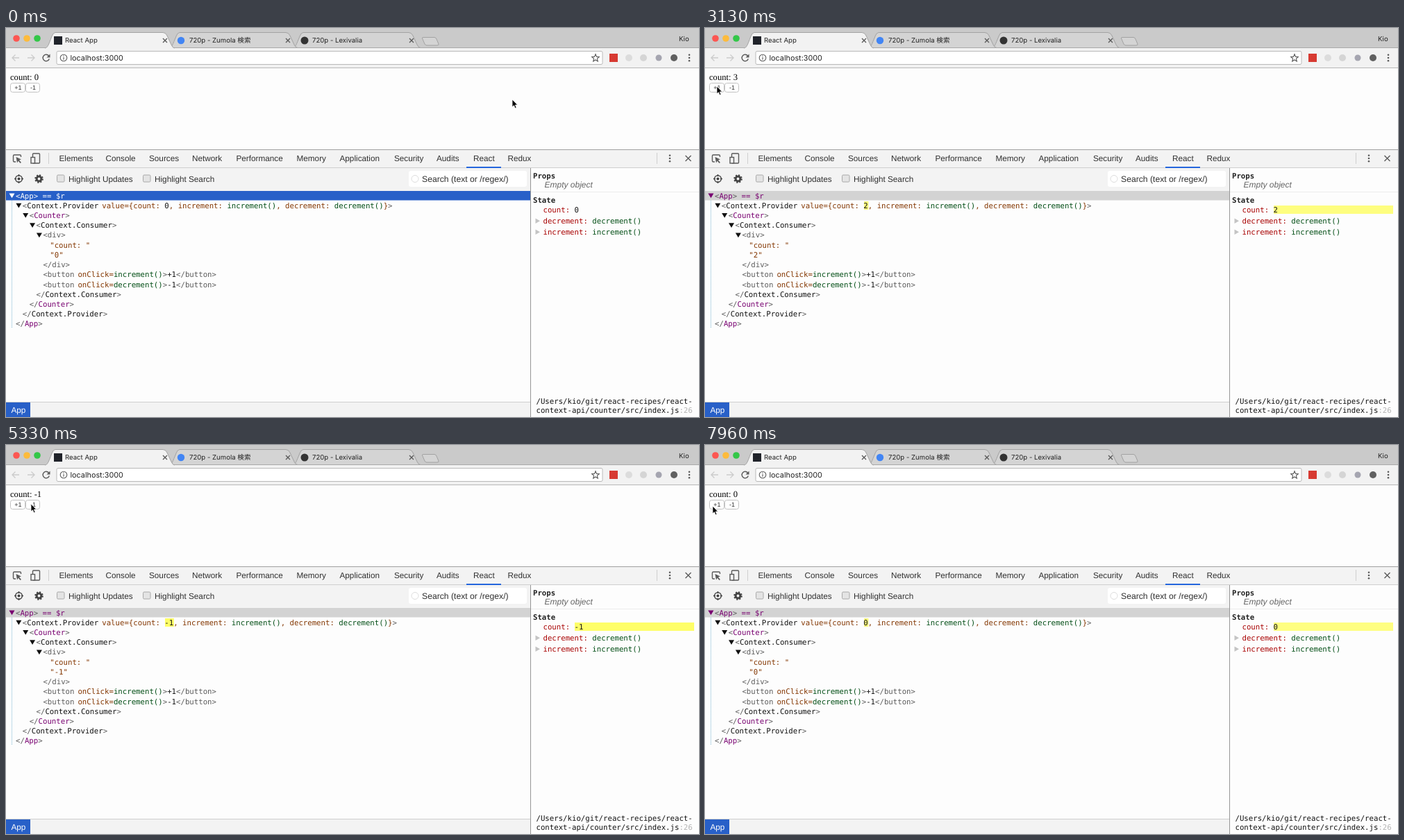
An HTML page for the animation above (8 s loop, 998 by 561 pixels).

```html
<!DOCTYPE html>
<html lang="en">
<head>
<meta charset="utf-8">
<title>Counter</title>
<style>
html, body { margin: 0; width: 100%; height: 100%; overflow: hidden; background: #fdfdfd }
svg { display: block; width: 998px; height: 561px }
text { white-space: pre; text-rendering: geometricPrecision; font: 11.75px "Liberation Sans", Arial, sans-serif; fill: #303030 }
.title { font: 9.6px Inter, "Noto Sans CJK JP", "Noto Sans CJK", sans-serif; fill: #222 }
.mono text { font: 10.7px "DejaVu Sans Mono", monospace; fill: #111 }
.mono .b { font-weight: bold; fill: #222 }
.p { fill: #780070 } .g { fill: #5c5c5c } .k { fill: #111 } .a { fill: #833600 }
.f { fill: #004d14 } .r { fill: #a80000 } .l { fill: #b4b4b4 }
.focus .sel { fill: #2860c8 } .sel { fill: #d3d3d3 }
.focus #row0 *, .focus #row0 { fill: #fff }
.line { fill: none; stroke: #5a5a5a; stroke-width: 1.4 }
</style>
</head>
<body>
<svg viewBox="0 0 998 561">
  <defs>
    <path id="close" class="line" d="M-3-3 3 3M3-3-3 3"/>
    <g id="dots" fill="#5a5a5a"><circle cy="-4.3" r="1.3"/><circle r="1.3"/><circle cy="4.3" r="1.3"/></g>
    <path id="down" d="M-4-3.3H4L0 3.5Z"/>
  </defs>

  <!-- tab strip -->
  <rect width="998" height="29" fill="#cacaca"/>
  <circle cx="15" cy="15" r="4.8" fill="#fc5652"/>
  <circle cx="30" cy="15" r="4.8" fill="#fdbb3c"/>
  <circle cx="45" cy="15" r="4.8" fill="#33c748"/>
  <g stroke="#a2a2a2" fill="#d4d4d4">
    <path d="M413 28.5C417 28 418 24 423 12Q425 6.5 428 6.5H580Q584 6.5 586 11L592 24Q594 28.5 597 28.5"/>
    <path d="M235 28.5C239 28 240 24 245 12Q247 6.5 250 6.5H403Q407 6.5 409 11L415 24Q417 28.5 420 28.5"/>
    <path d="M601 13.5H617Q619 13.5 620 16L623 23Q623.5 25 621 25H606Q604 25 603 23L599.5 15Q599 13.5 601 13.5Z"/>
  </g>
  <path d="M0 28.5H998" stroke="#a9a9a9"/>
  <rect y="29" width="998" height="28" fill="#f2f2f2"/>
  <path d="M56 29C60 28.5 61 25 66 12Q68 6.5 71 6.5H226Q230 6.5 232 11L238 24Q240 29 243 29" fill="#f2f2f2" stroke="#a2a2a2"/>
  <rect x="57" y="29" width="185" height="2" fill="#f2f2f2"/>
  <rect x="69" y="12" width="12" height="12" fill="#20232a"/>
  <circle cx="252" cy="18" r="5.2" fill="#4285f4"/>
  <circle cx="430" cy="18" r="5.5" fill="#333"/>
  <text class="title" x="85" y="21">React App</text>
  <text class="title" x="264" y="21">720p - Zumola 検索</text>
  <text class="title" x="441" y="21">720p - Lexivalia</text>
  <text class="title" x="969" y="19">Kio</text>
  <use href="#close" x="229" y="18"/><use href="#close" x="406" y="18"/><use href="#close" x="584" y="18"/>

  <!-- address bar -->
  <path d="M0 57.5H998" stroke="#b8b8b8"/>
  <path d="M19 43H9M13.5 38.5 9 43 13.5 47.5M31 43H41M36.5 38.5 41 43 36.5 47.5" class="line" style="stroke:#ccc"/>
  <path d="M61.5 40A4.7 4.7 0 1 0 62.3 44.5" class="line"/>
  <path d="M63.5 37.5V42.5H58.5Z" fill="#5a5a5a"/>
  <rect x="73" y="33.5" width="786" height="19" rx="2" fill="#fff" stroke="#b9b9b9"/>
  <text class="title" x="92.5" y="46.8" style="font-size:10.8px">localhost:3000</text>
  <g class="line" style="stroke-width:1.1"><circle cx="83" cy="43" r="4.8"/><path d="M83 42V45.8M83 39.8V41"/>
    <path d="M849 37.8 850.5 41.4 854.3 41.7 851.4 44.2 852.3 48 849 46 845.7 48 846.6 44.2 843.7 41.7 847.5 41.4Z"/></g>
  <rect x="869" y="37" width="12" height="12" fill="#d73a32"/>
  <circle cx="897" cy="43" r="5" fill="#dcdcdc"/><circle cx="918" cy="43" r="5" fill="#d5d5d5"/>
  <circle cx="940" cy="43" r="4.5" fill="#a5a5b0"/><circle cx="962" cy="43" r="5" fill="#606060"/>
  <use href="#dots" x="984" y="43"/>

  <!-- web page -->
  <text x="6" y="75" style="font:12.6px 'Liberation Serif',Times,serif;fill:#000">count: <tspan id="pageCount"></tspan></text>
  <g fill="#fff" stroke="#c2c2c2"><rect x="6.5" y="79.5" width="21" height="13" rx="3"/><rect x="28.5" y="79.5" width="20" height="13" rx="3"/></g>
  <g text-anchor="middle"><text x="17.5" y="89" style="font-size:9px">+1</text><text x="39" y="89" style="font-size:9px">-1</text></g>

  <!-- developer tools bars -->
  <rect y="175" width="998" height="27" fill="#f3f3f3"/>
  <rect y="202" width="755" height="33" fill="#f3f3f3"/>
  <path d="M0 175.5H998" stroke="#a0a0a0"/>
  <path d="M0 201.5H998M61.5 180V196M937.5 180V196M0 539.5H755" stroke="#cfcfcf"/>
  <rect x="663" y="200" width="50" height="2" fill="#2466dd"/>
  <g id="tabs"></g>
  <g class="line"><path d="M14 193H12Q10.5 193 10.5 191.5V184.5Q10.5 183 12 183H20Q21.5 183 21.5 184.5V186"/>
    <rect x="38.5" y="181" width="10" height="14" rx="1"/><rect x="36" y="186.5" width="5.5" height="8.5" fill="#f3f3f3"/></g>
  <path d="M14.5 186 22 189.5 19 190.5 22 194 20.5 195 17.8 191.8 16 194.5Z" fill="#5a5a5a"/>
  <use href="#dots" x="956" y="188"/>
  <path d="M978.5 184 986.5 192M986.5 184 978.5 192" class="line"/>
  <g class="line" style="stroke:#444"><circle cx="18.5" cy="217.5" r="4.8"/><path d="M18.5 211V214M18.5 221V224M12 217.5H15M22 217.5H25"/></g>
  <circle cx="18.5" cy="217.5" r="2" fill="#444"/>
  <g fill="none" stroke="#444"><circle cx="47.5" cy="217.5" r="3.4" stroke-width="3"/>
    <circle cx="47.5" cy="217.5" r="5.3" stroke-width="2" stroke-dasharray="2.08"/></g>
  <g fill="#e4e4e4" stroke="#a9a9a9"><rect x="73.5" y="212" width="10.5" height="10" rx="1.5"/><rect x="197.5" y="212" width="10.5" height="10" rx="1.5"/></g>
  <text x="90" y="222">Highlight Updates</text>
  <text x="214" y="222">Highlight Search</text>
  <rect x="580" y="206" width="170" height="23" rx="3" fill="#fff"/>
  <circle cx="589" cy="217.5" r="5" fill="none" stroke="#ddd"/>
  <text x="599" y="222" style="font-size:12.2px">Search (text or /regex/)</text>

  <!-- component tree -->
  <g id="tree" class="mono">
    <rect class="sel" y="235" width="755" height="13.5"/>
    <path d="M8.5 249V433" stroke="#7fb9d4" stroke-dasharray="1 1"/>
    <rect id="treeFlash" x="229" y="250" height="12" fill="#ff0"/>
  </g>
  <rect y="540" width="755" height="21" fill="#f3f3f3"/>
  <rect y="540" width="35" height="21" fill="#2860c8"/>
  <text x="7.5" y="554.5" style="fill:#fff">App</text>

  <!-- side pane -->
  <path d="M755.5 202V561" stroke="#969696"/>
  <path d="M756 236.5H998" stroke="#ececec"/>
  <rect id="paneFlash" x="819" y="256" width="172" height="12" fill="#ff0"/>
  <text x="775.5" y="230" style="font-size:12px;font-style:italic;fill:#666">Empty object</text>
  <path d="M762.5 274.5V282L769 278.2ZM762.5 290.5V298L769 294.2Z" fill="#c4c4c4"/>
  <g class="mono">
    <text x="759" y="216.5" class="b">Props</text>
    <text x="759" y="251.5" class="b">State</text>
    <text x="773.5" y="265.5"><tspan class="r">count:</tspan> <tspan id="paneCount"></tspan></text>
    <text x="773.5" y="282"><tspan class="r">decrement:</tspan> <tspan class="f">decrement()</tspan></text>
    <text x="773.5" y="298"><tspan class="r">increment:</tspan> <tspan class="f">increment()</tspan></text>
    <text x="763.5" y="542">/Users/kio/git/react-recipes/react-</text>
    <text x="763.5" y="554.5">context-api/counter/src/index.js<tspan class="l">:26</tspan></text>
  </g>
  <path id="cursor" d="M0 0V11L2.5 8.7 4.2 12.7 6.1 11.9 4.4 8H7.7Z" stroke="#fff" stroke-width=".8"/>
</svg>
<script>
const $ = id => document.getElementById(id);
const esc = s => s.replace(/</g, '&lt;').replace(/>/g, '&gt;');
const span = (cls, s, dx = 0) => `<tspan class="${cls}" dx="${dx}">${esc(s)}</tspan>`;
const slot = (id, cls) => `<tspan id="${id}" class="${cls}"></tspan>`;
const attr = s => span('a', s, 5);
const open = (cls, name) => span('g', '<') + span(cls, name) + span('g', '>');
const shut = (cls, name) => span('g', '</') + span(cls, name) + span('g', '>');
const button = (fn, label) => span('g', '<button') + attr('onClick=') + span('f', fn) +
  span('g', '>') + span('k', label) + shut('g', 'button');

// [depth, content, expandable]
const rows = [
  [0, open('p', 'App') + span('p', ' == $r'), 1],
  [1, span('g', '<') + span('k', 'Context.Provider') + attr('value={count: ') + slot('treeCount', 'k') +
    span('a', ', increment: ') + span('f', 'increment()') + span('a', ', decrement: ') +
    span('f', 'decrement()') + span('a', '}') + span('g', '>'), 1],
  [2, open('p', 'Counter'), 1],
  [3, open('k', 'Context.Consumer'), 1],
  [4, open('g', 'div'), 1],
  [5, span('a', '"count: "')],
  [5, span('a', '"') + slot('childCount', 'a') + span('a', '"')],
  [4, shut('g', 'div')],
  [4, button('increment()', '+1')],
  [4, button('decrement()', '-1')],
  [3, shut('k', 'Context.Consumer')],
  [2, shut('p', 'Counter')],
  [1, shut('k', 'Context.Provider')],
  [0, shut('p', 'App')]
];
$('tree').insertAdjacentHTML('beforeend', rows.map(([depth, content, expandable], i) => {
  const x = 14 + depth * 9.85, y = 245.6 + i * 14.22;
  const arrow = expandable ? `<use href="#down" x="${x - 5.5}" y="${y - 3.8}" class="${i ? 'k' : 'p'}"/>` : '';
  return `<g id="row${i}">${arrow}<text x="${x}" y="${y}">${content}</text></g>`;
}).join(''));

const tabs = { Elements: 76.5, Console: 143.5, Sources: 206, Network: 268, Performance: 331.5, Memory: 418.5,
  Application: 480.5, Security: 559, Audits: 620, React: 673, Redux: 722.5 };
$('tabs').innerHTML = Object.entries(tabs).map(([name, x]) => `<text x="${x}" y="192">${name}</text>`).join('');

// [time, x, y]
const path = [[0, 729, 103], [667, 729, 103], [790, 601, 92], [958, 601, 92], [1350, 120, 86], [1600, 13, 83],
  [1790, 17, 84], [3250, 17, 84], [3560, 36, 85], [6300, 36, 85], [6700, 7, 88], [6875, 10, 88],
  [7000, 11, 88], [8000, 11, 88]];
// [time, count]
const clicks = [[0, 0], [2400, 1], [2750, 2], [3100, 3], [3600, 2], [3870, 1], [4130, 0],
  [4980, -1], [5390, -2], [5790, -3], [7190, -2], [7390, -1], [7580, 0]];
const lag = 80, fade = 1000, frame = 1000 / 24, loop = 8000, charWidth = 6.44;
const last = (list, t) => list.findLast(item => item[0] <= t) || list[0];

function cursorAt(t) {
  const i = path.indexOf(last(path, t));
  const [t0, x0, y0] = path[i], [t1, x1, y1] = path[i + 1] || [loop, x0, y0];
  const p = (t - t0) / (t1 - t0), e = p * p * (3 - 2 * p);
  return [x0 + (x1 - x0) * e, y0 + (y1 - y0) * e];
}

function draw(now) {
  const t = Math.floor(now % loop / frame) * frame;
  const [since, count] = last(clicks, t - lag);
  const alpha = since ? Math.max(0, 1 - (t - lag - since) / fade) ** 2 : 0;
  $('pageCount').textContent = last(clicks, t)[1];
  for (const id of ['treeCount', 'childCount', 'paneCount']) $(id).textContent = count;
  $('treeFlash').setAttribute('width', String(count).length * charWidth);
  for (const id of ['treeFlash', 'paneFlash']) $(id).setAttribute('opacity', alpha);
  $('tree').classList.toggle('focus', t < 2370);
  $('cursor').setAttribute('transform', `translate(${cursorAt(t)})`);
}

const start = performance.now();
function tick() {
  draw(performance.now() - start);
  requestAnimationFrame(tick);
}
tick();
</script>
</body>
</html>
```
